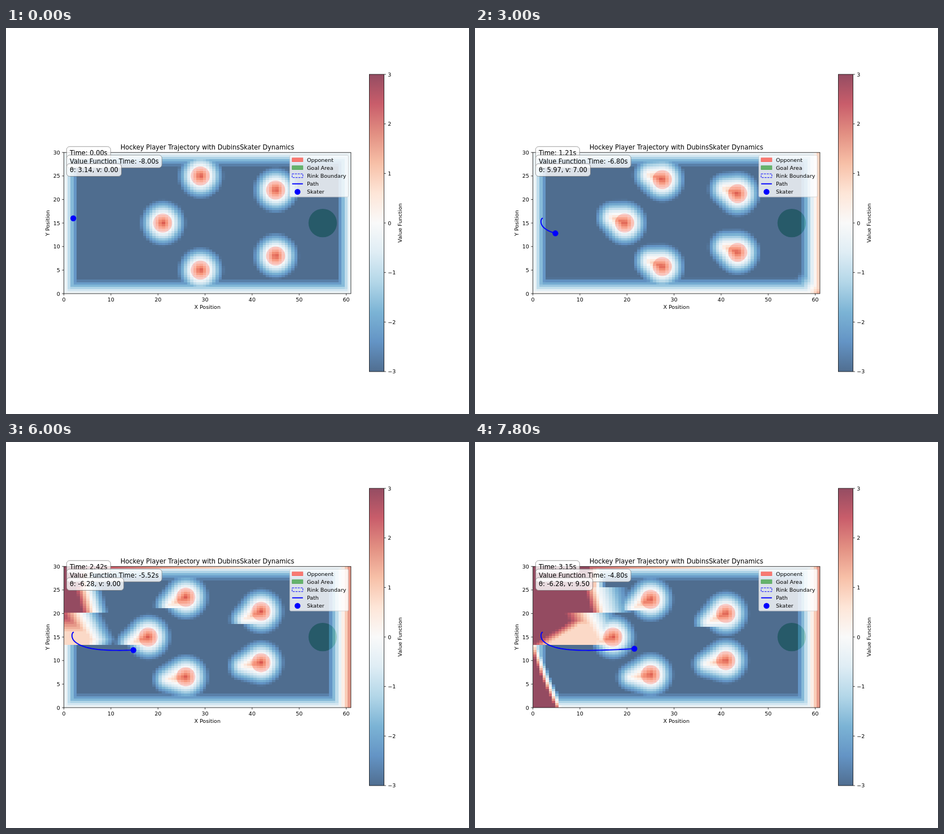
Recreate the animation shown at these times as an HTML page with a canvas. Size 820 px wide and 683 px high, loop 8000 ms.

```html
<!DOCTYPE html>
<html lang="en">
<head>
<meta charset="utf-8">
<title>Skater trajectory</title>
<style>
  html, body { margin: 0; width: 100%; height: 100%; overflow: hidden; background: #fff; }
  svg, canvas { position: absolute; left: 0; top: 0; }
  canvas { left: 102.5px; top: 220.2px; width: 508.4px; height: 249.8px; opacity: .7; image-rendering: pixelated; }
  text { font: 9.49px "DejaVu Sans", sans-serif; fill: #000; }
  .big { font-size: 11.39px; }
  .mid { text-anchor: middle; }
  .end { text-anchor: end; }
  .axis { fill: none; stroke: #000; stroke-width: .76; }
</style>
</head>
<body>
<svg id="back" width="820" height="683" viewBox="0 0 820 683"></svg>
<canvas id="field" width="91" height="61"></canvas>
<svg id="front" width="820" height="683" viewBox="0 0 820 683"></svg>
<script>
const STEP = 200, STEPS = 40, DT = 8 / 99;
const COLS = 91, ROWS = 61, W = 61, H = 30, UNIT = 8.335;
const px = x => 102.5 + x * UNIT;
const py = y => 470 - y * 8.327;
const clamp = (v, a, b) => Math.min(b, Math.max(a, v));
const $ = id => document.getElementById(id);

// Diverging red-blue colour scale, low to high
const SCALE = ['053061', '2166ac', '4393c3', '92c5de', 'd1e5f0', 'f7f7f7',
  'fddbc7', 'f4a582', 'd6604d', 'b2182b', '67001f'];
const RGB = SCALE.map(h => [0, 2, 4].map(i => parseInt(h.slice(i, i + 2), 16)));

// x, y, vertical drift, tail tilt and cut while turning, tilt and cut afterwards
const OPPONENTS = [
  [21, 15, 0, .15, 2.1, .35, -1.95],
  [29, 25, -.05, 0, 0, .45, -2.5],
  [29, 5, .05, .15, 2.5, .12, 0],
  [45, 22, -.05, 0, 0, .45, -2.55],
  [45, 8, .05, .15, 2.5, .17, 0]
];

// Skater motion
const speed = t => 10 * (1 - Math.exp(-t));
const turn = t => t < .78 ? 3.1 * t : 3.2 - .782 * Math.exp(-2 * (t - .78));

const track = (() => {
  const pts = [], sub = 40, d = DT / sub;
  let x = 2, y = 16;
  for (let i = 0; i < STEPS; i++) {
    const t0 = i * DT;
    pts.push([px(x + .35 * (1 - Math.exp(-5 * t0 * t0))), py(y)]);
    for (let k = 0; k < sub; k++) {
      const t = t0 + (k + .5) * d;
      x -= speed(t) * Math.cos(turn(t)) * d;
      y -= speed(t) * Math.sin(turn(t)) * d;
    }
  }
  return pts;
})();

function opponentState(s) {
  const idx = Math.round(s * 1.03), delta = turn(s * DT), after = delta > Math.PI;
  const len = s < 20 ? .19 * s : 3.8 + .03 * (s - 20);
  return OPPONENTS.map(([x, y, drift, tiltA, cutA, tiltB, cutB]) => {
    const lean = tiltA * clamp((s - 12) / 6, 0, 1);
    const ang = after ? Math.PI + tiltB : Math.PI - (Math.PI - delta) * .8 - .12 - lean;
    return {
      x: x - .1 * idx, y: y + drift * idx, len,
      ux: Math.cos(ang), uy: Math.sin(ang),
      cut: after ? cutB : s > 15 ? cutA : 0
    };
  });
}

// Distance to a disc, drawn out into a fading tail
const FADE = .42, SPREAD = FADE / Math.sqrt(1 - FADE * FADE);
function opponentValue(o, x, y) {
  const dx = x - o.x, dy = y - o.y, disc = 2 - Math.hypot(dx, dy);
  const along = dx * o.ux + dy * o.uy;
  if (along <= 0 || (o.cut > 0 && dy > o.cut) || (o.cut < 0 && dy < o.cut)) return disc;
  const side = Math.abs(dx * o.uy - dy * o.ux);
  const u = clamp(along - side * SPREAD, 0, o.len);
  return Math.max(disc, 2 - FADE * u - Math.hypot(along - u, side));
}

// Edge offsets interpolated over [step, value] knots
function ramp(s, ...knots) {
  for (let i = 1; i < knots.length; i++) {
    const [a, va] = knots[i - 1], [b, vb] = knots[i];
    if (s <= b) return va + (vb - va) * (s - a) / (b - a);
  }
  return knots[knots.length - 1][1];
}

// Red front that sweeps in from the left
function frontValue(s, x, y) {
  const edge = 1.7 + (s - 26) * .95, late = clamp((s - 33) / 6, 0, 1);
  if (y > 20.4) {
    const v = edge - .4 + Math.max(0, 25 - y) * .3 - x;
    return y > 25.4 ? v * 1.7 : v < 0 ? v * (1 - .55 * late) : v * 1.15;
  }
  if (y > 13.1) {
    const slope = .9 - .35 * clamp((s - 26) / 7, 0, 1);
    const base = 16 + late * (1.7 - Math.max(0, 10 - x) * .62);
    const cap = .8 + Math.max(0, y - base) * (.6 + .5 * late);
    return Math.min((edge + 1.2 - .55 * Math.abs(y - 14.5) - x) * slope, cap);
  }
  const d = 13 - y;
  return (.5 + .28 * d + .01 * d * d - (39 - s) * .95 - x) * 3;
}

const ctx = $('field').getContext('2d');
const image = ctx.createImageData(COLS, ROWS);

function drawField(s, opps) {
  const right = ramp(s, [0, 0], [8, 0], [12, .7], [19, 1.8], [24, 2]);
  const bottom = ramp(s, [0, 0], [8, .5], [12, .4], [19, .1], [23, 0]);
  const corner = ramp(s, [0, -3], [8, -1], [12, 1.2], [19, 2.2], [24, 1], [25, -3]);
  for (let j = 0, p = 0; j < ROWS; j++) {
    const y = H - (j + .5) * H / ROWS;
    for (let i = 0; i < COLS; i++, p += 4) {
      const x = (i + .5) * W / COLS;
      let v = Math.max(-x, y - H, right - (W - x), bottom - y,
        corner - .75 * Math.hypot(W - x, y));
      for (const o of opps) v = Math.max(v, opponentValue(o, x, y));
      if (s > 22) {
        v = Math.max(v, frontValue(s, x, y));
        if (j === 0) v = Math.max(v, 3 - x * .065);
      }
      const q = (clamp(v, -3, 3) + 3) / .6, k = Math.min(9, Math.floor(q)), f = q - k;
      for (let c = 0; c < 3; c++) image.data[p + c] = RGB[k][c] + (RGB[k + 1][c] - RGB[k][c]) * f;
      image.data[p + 3] = 255;
    }
  }
  ctx.putImageData(image, 0, 0);
}

// Static parts
const text = (x, y, str, cls = '') => `<text x="${x}" y="${y}" class="${cls}">${str}</text>`;
const upright = (x, y, str) => `<text class="mid" transform="translate(${x} ${y}) rotate(-90)">${str}</text>`;
const line = (x1, y1, x2, y2) => `<path class="axis" d="M${x1} ${y1}L${x2} ${y2}"/>`;

$('back').innerHTML =
  `<circle cx="${px(55)}" cy="${py(15)}" r="25.2" fill="#78be7c"/>` +
  OPPONENTS.map(() => '<circle class="opp" r="16.9" fill="#f9706b"/>').join('');

function axes() {
  let out = '<rect class="axis" x="102.5" y="220.2" width="508.4" height="249.8"/>';
  for (let v = 0; v <= 60; v += 10)
    out += line(px(v), 470, px(v), 473.3) + text(px(v), 484.3, v, 'mid');
  for (let v = 0; v <= 30; v += 5)
    out += line(102.5, py(v), 99.2, py(v)) + text(95.9, py(v) + 3.5, v, 'end');
  return out + text(356.7, 497.3, 'X Position', 'mid') + upright(77.2, 345, 'Y Position') +
    text(356.7, 214.5, 'Hockey Player Trajectory with DubinsSkater Dynamics', 'mid big');
}

function colorbar() {
  const stops = SCALE.map((c, i) => `<stop offset="${i / 10}" stop-color="#${c}"/>`).join('');
  let out = `<linearGradient id="bar" x1="0" y1="1" x2="0" y2="0">${stops}</linearGradient>
    <rect x="643.4" y="82" width="26.2" height="526" fill="url(#bar)" opacity=".7"/>
    <rect class="axis" x="643.4" y="82" width="26.2" height="526"/>`;
  for (let v = -3; v <= 3; v++) {
    const y = 345 - v * 87.65;
    out += line(669.6, y, 672.9, y) + text(676.2, y + 3.5, v < 0 ? '\u2212' + -v : v);
  }
  return out + upright(701, 345, 'Value Function');
}

function legend() {
  const patch = (y, style) => `<rect x="506.8" y="${y - 3.3}" width="19" height="6.6" ${style}/>`;
  const names = ['Opponent', 'Goal Area', 'Rink Boundary', 'Path', 'Skater'];
  return `<rect x="502.7" y="225" width="103.6" height="74" rx="2" fill="#fff" stroke="#ccc" stroke-width=".95" opacity=".8"/>` +
    patch(233.2, 'fill="#f77a72" stroke="#f4645e" stroke-width=".9"') +
    patch(247.1, 'fill="#66b36c" stroke="#52a458" stroke-width=".9"') +
    patch(261.4, 'fill="none" stroke="#00f" stroke-width=".95" stroke-dasharray="3.5 1.5"') +
    '<path d="M506.8 275.7H525.8" stroke="#00f" stroke-width="1.9"/>' +
    '<circle cx="516.3" cy="289.9" r="5.2" fill="#00f"/>' +
    names.map((n, i) => text(533, 236.6 + i * 14.15, n)).join('');
}

const notes = [0, 1, 2].map(i =>
  `<rect class="box" x="107.3" y="${209.8 + i * 15.1}" height="22.5" rx="5.5" fill="#fff" stroke="#808080" stroke-width=".95" opacity=".8"/>` +
  `<text class="note big" x="113" y="${225 + i * 15.1}"></text>`).join('');

$('front').innerHTML = axes() + colorbar() +
  '<polyline id="path" fill="none" stroke="#00f" stroke-width="1.9" stroke-linejoin="round" stroke-linecap="square"/>' +
  '<circle id="skater" r="5.2" fill="#00f"/>' + legend() + notes;

const oppEls = document.querySelectorAll('.opp');
const boxEls = document.querySelectorAll('.box');
const noteEls = document.querySelectorAll('.note');

function labels(s) {
  const t = s * DT, delta = turn(t), bin = Math.PI / 10;
  const theta = delta > Math.PI ? -2 * Math.PI : Math.PI + Math.round(delta / bin) * bin;
  const v = Math.round(speed(t) * 2) / 2;
  return [
    `Time: ${(Math.floor(t * 100) / 100).toFixed(2)}s`,
    `Value Function Time: ${(Math.round(s * 1.03) * .08 - 8).toFixed(2)}s`,
    `θ: ${theta.toFixed(2)}, v: ${v.toFixed(2)}`
  ];
}

function render(s) {
  const opps = opponentState(s);
  drawField(s, opps);
  opps.forEach((o, i) => {
    oppEls[i].setAttribute('cx', px(o.x));
    oppEls[i].setAttribute('cy', py(o.y));
  });
  $('path').setAttribute('points', track.slice(0, s + 1).join(' '));
  $('skater').setAttribute('cx', track[s][0]);
  $('skater').setAttribute('cy', track[s][1]);
  labels(s).forEach((str, i) => {
    noteEls[i].textContent = str;
    boxEls[i].setAttribute('width', noteEls[i].getComputedTextLength() + 11.4);
  });
}

const start = performance.now();
let shown = -1;
function tick() {
  const s = Math.floor((performance.now() - start) / STEP) % STEPS;
  if (s !== shown) render(shown = s);
  requestAnimationFrame(tick);
}
tick();
</script>
</body>
</html>
```
